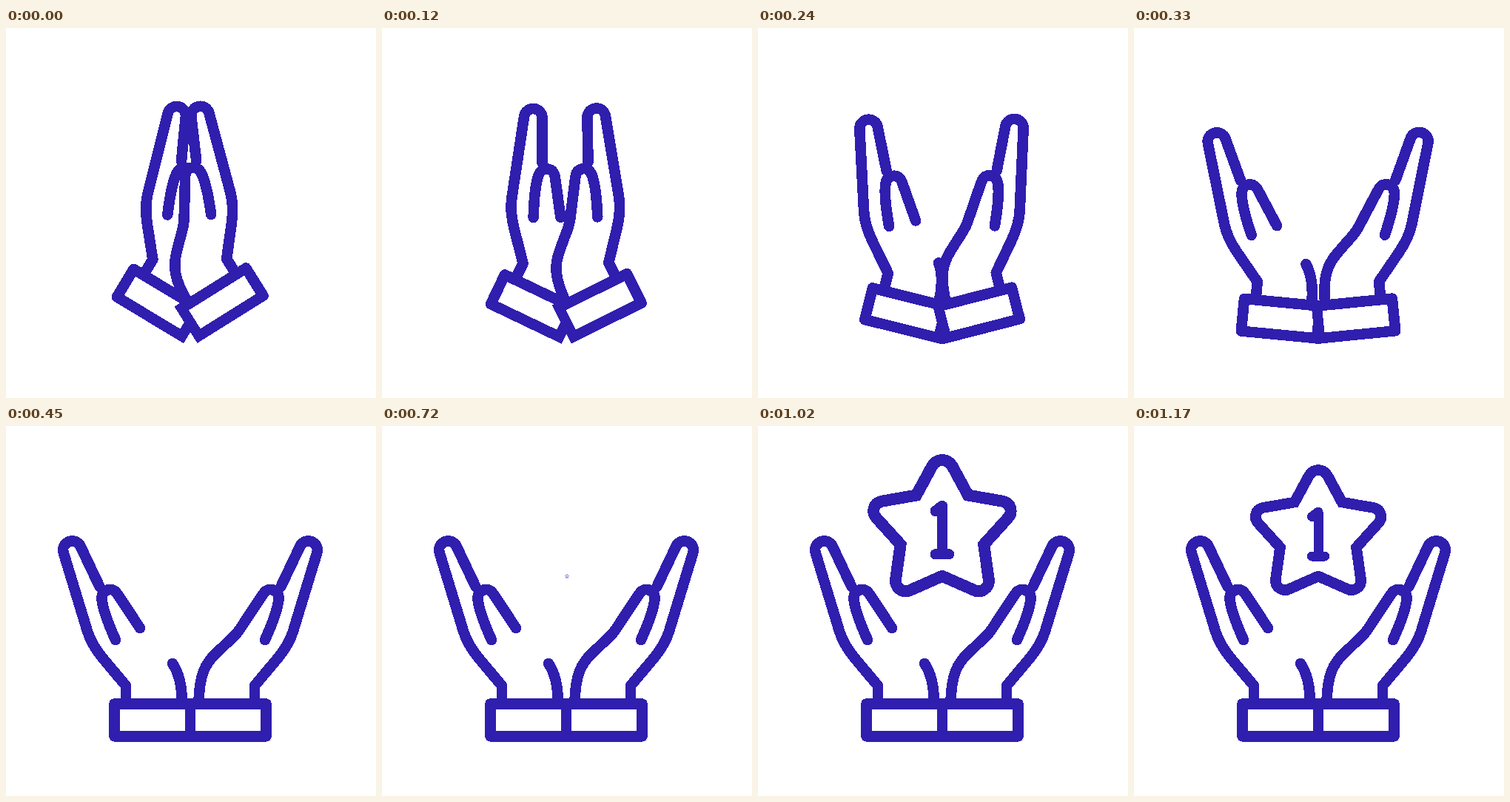
Recreate the animation shown at these times as an HTML page. Size 500 px wide and 500 px high, loop 2.7 s.

```html
<!DOCTYPE html>
<html lang="en">
<head>
<meta charset="utf-8">
<title>Hands and star</title>
<style>
  html, body { margin: 0; width: 100%; height: 100%; overflow: hidden; background: #fff; }
  svg { display: block; width: 100%; height: 100%; }
  .ink { fill: none; stroke: #301eae; stroke-width: 14.6; stroke-linecap: round; }
  .hand { stroke-linejoin: round; }
  .digit { stroke-width: 13; stroke-linejoin: round; }
  .solid { fill: #301eae; }
  .paper { fill: #fff; }
</style>
</head>
<body>
<svg viewBox="0 0 500 500" shape-rendering="crispEdges">
  <g id="left"></g>
  <g id="right"></g>
  <g id="star"></g>
</svg>
<script>
const LOOP = 2700, TICK = 30;
const HANDS_TICKS = 15;
const STAR_START = 23, STAR_GROW = 10, STAR_SETTLE = 6, STAR_PEAK = 1.1;

const path = (cls, d) => `<path class="${cls}" d="${d}"/>`;
const mirror = art => `<g transform="matrix(-1 0 0 1 498 0)">${art}</g>`;

// Both hands share the left-hand coordinates; the right one is mirrored at x = 249.
const finger = 'M162 376V351L131 314C121 302 114 290.5 110 277.3L77.7 171.3A12.3 12.3 0 0 1 100.6 162.5L126.5 217';
const thumbSide = 'C146.5 221 149.5 225 151.7 228.7L181 273';
const knuckle = 'M148 289C139 269 131 250 129.5 234C129 225 135 221 141 221' + thumbSide;
const palm = 'C187 283 193 287 203 296.5L214 307C228 320 237.5 336 237.5 376';
const thumb = 'M225 321Q238 340 238 376';
const cuff =
  path('solid', 'M256 368.3H146.2a7 7 0 0 0-7 7V419.6a7 7 0 0 0 7 7H256Z') +
  path('paper', 'M153.8 382.8H242V412.2H153.8Z');

const halfStar = 'M249 59.5C243 59.5 239 63 236.5 67L217 103L174 110.5C164 112.5 161 124.5 168 131.5' +
  'L197.5 164L191.5 207C190 218 201 225 210.5 220L249 203';

const left = document.getElementById('left');
const right = document.getElementById('right');
const star = document.getElementById('star');

left.innerHTML = path('ink hand', finger) + path('ink hand', knuckle) + path('ink hand', thumb) + cuff;
right.innerHTML = mirror(
  path('paper', finger + 'L141 221' + thumbSide + palm + 'Z') +
  path('ink hand', finger) + path('ink hand', knuckle + palm) + cuff
);
star.innerHTML = path('ink', halfStar) + mirror(path('ink', halfStar)) +
  path('ink digit', 'M240.5 122.5L249 116V176M240.5 176H257.5');

const ease = p => {
  p = Math.min(1, Math.max(0, p));
  return p * p * (3 - 2 * p);
};

function draw(ms) {
  const tick = Math.floor((ms % LOOP) / TICK);

  const closed = 1 - ease(tick / HANDS_TICKS);
  left.setAttribute('transform', `rotate(${31 * closed} 249 397.5)`);
  right.setAttribute('transform', `rotate(${-32 * closed} 249 397.5)`);

  const k = tick - STAR_START;
  const size = STAR_PEAK * ease(k / STAR_GROW) -
    (STAR_PEAK - 1) * ease((k - STAR_GROW) / STAR_SETTLE);
  star.setAttribute('display', size > 0 ? 'inline' : 'none');
  star.setAttribute('transform', `translate(250 205) scale(${size}) translate(-250 -205)`);
}

const start = performance.now();
function loop() {
  draw(performance.now() - start);
  requestAnimationFrame(loop);
}
loop();
</script>
</body>
</html>
```
